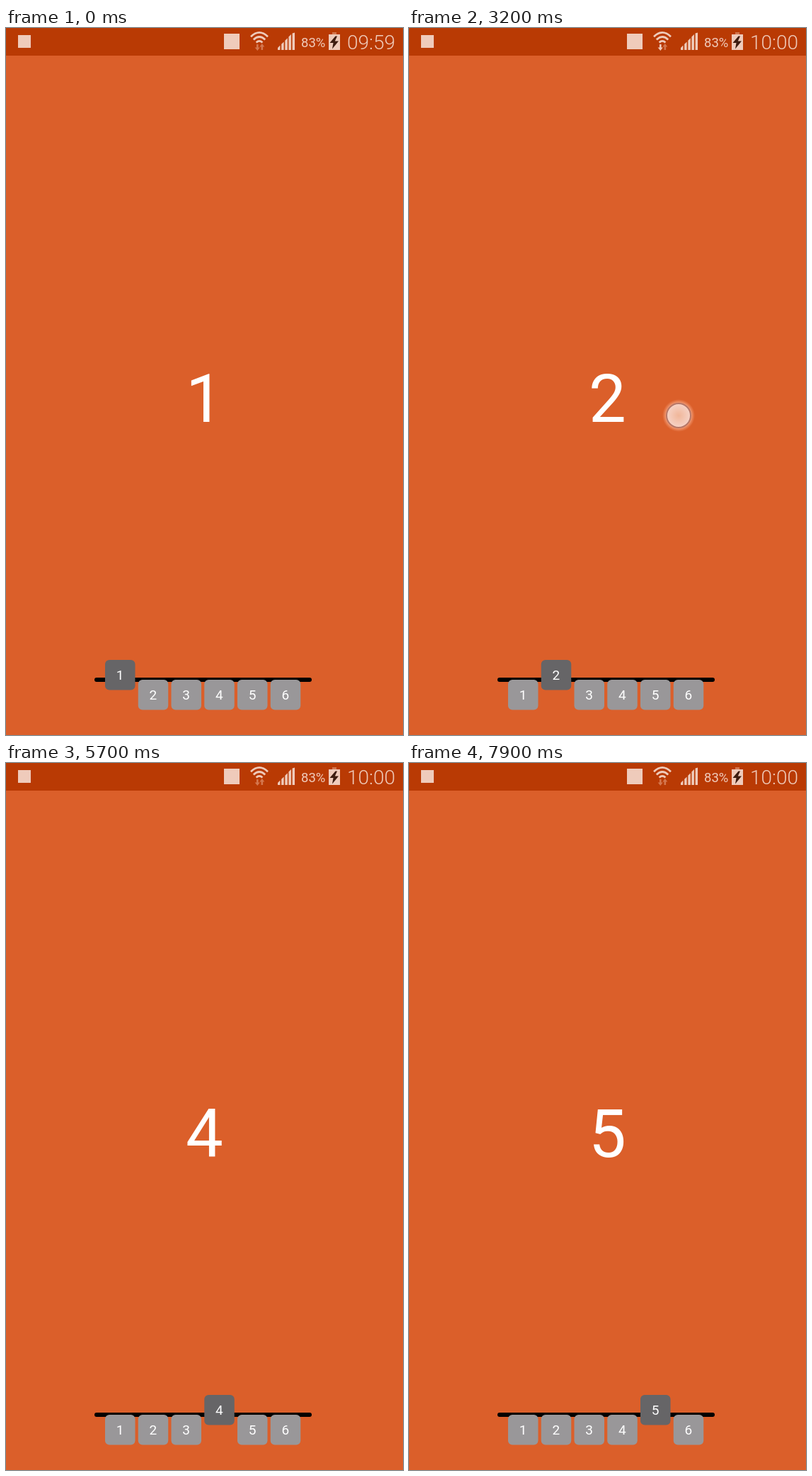
These frames come from a looping animation (561 px wide and 998 px high, 8000 ms). An HTML page:

```html
<!DOCTYPE html>
<html lang="en">
<head>
<meta charset="utf-8">
<title>Pager</title>
<style>
  html, body { margin: 0; width: 100%; height: 100%; overflow: hidden; background: #db5f2a; }
  svg { display: block; width: 100vw; height: 100vh; }
  text { font-family: Roboto, sans-serif; fill: #fff; text-anchor: middle; }
  .page { font-size: 94px; }
  .tab { font-size: 19px; }
  .status { fill: #efcbbb; }
  .status text { fill: #efcbbb; text-anchor: start; }
</style>
</head>
<body>
<svg viewBox="0 0 561 998">
  <defs>
    <radialGradient id="glow">
      <stop offset=".72" stop-color="#ffc3a8" stop-opacity=".75"/>
      <stop offset="1" stop-color="#ffb08c" stop-opacity="0"/>
    </radialGradient>
    <radialGradient id="dot">
      <stop offset="0" stop-color="#f0b699"/>
      <stop offset="1" stop-color="#f6d3c7"/>
    </radialGradient>
  </defs>
  <rect width="561" height="998" fill="#db5f2a"/>
  <rect width="561" height="39" fill="#b93a04"/>
  <g class="status">
    <rect x="17" y="10" width="18" height="18"/>
    <rect x="308" y="8" width="22" height="22"/>
    <g fill="none" stroke="#efcbbb" stroke-width="2.7">
      <path d="M346 12.2Q358 .6 370 12.2"/>
      <path d="M349.8 16.4Q358 8.6 366.2 16.4"/>
      <path d="M353.6 20.4Q358 16.4 362.4 20.4"/>
    </g>
    <path id="down" d="M354 23h2.6v4.5h2.2L355.300 32 351.600 27.500H354z"/>
    <path id="up" fill="#d4774f" d="M360.500 31h2.600v-4.500h2.200L361.800 22 358.300 26.500h2.200z"/>
    <path d="M384 31v-3l3.400-3.400V31zM389.200 31v-8.200l3.400-3.400V31zM394.300 31V17.700l3.500-3.500V31zM399.400 31V12.600l3.500-3.500V31zM404.600 31V7.600L408 6.500V31z"/>
    <text x="417" y="26.500" font-size="18.500">83%</text>
    <path fill="#d4774f" d="M461 6h6v4h-6z"/>
    <path d="M456 9h16v22h-16z"/>
    <path fill="#3d1c10" d="M465.500 11.500 457.500 21h5l-1.500 8.500 9-11h-5.200l3.200-7z"/>
    <text id="clock" x="482" y="30" font-size="28" font-weight="300"></text>
  </g>
  <g id="pages"></g>
  <path d="M128 920H429" stroke="#000" stroke-width="6" stroke-linecap="round"/>
  <g id="tabs"></g>
  <g id="touch">
    <circle r="23" fill="url(#glow)"/>
    <circle r="17" fill="url(#dot)" stroke="#b77767" stroke-width="2"/>
  </g>
</svg>
<script>
const LOOP = 8000, STEP = 100, WIDTH = 561, SETTLE = 480, FADE = 160, LIFT = 28;

// Each swipe goes one page on: touch times, finger path, page travel at release
const swipes = [
  { down: 1500, up: 1704, from: 345, to: 240, y: 560, drag: 91 },
  { down: 3200, up: 3328, from: 381, to: 320, y: 547, drag: 50 },
  { down: 4945, up: 5026, from: 352, to: 258, y: 547, drag: 77 },
  { down: 6500, up: 6626, from: 245, to: 200, y: 585, drag: 34 }
];

const $ = id => document.getElementById(id);
const clamp = v => Math.max(0, Math.min(1, v));

function add(parent, name, attrs, text = '') {
  const el = document.createElementNS('http://www.w3.org/2000/svg', name);
  for (const key in attrs) el.setAttribute(key, attrs[key]);
  el.textContent = text;
  return parent.appendChild(el);
}

const pages = [], tabs = [];
for (let i = 0; i < 6; i++) {
  pages.push(add($('pages'), 'text', { class: 'page', y: 555.5 }, i + 1));
  const g = add($('tabs'), 'g', {});
  const box = add(g, 'rect', { width: 42.5, height: 42.5, rx: 6 });
  add(g, 'text', { class: 'tab', x: 21, y: 27.8 }, i + 1);
  tabs.push({ g, box });
}

function draw(t) {
  let scroll = 0, selected = 0, tabPos = 0, touch = null;
  for (const s of swipes) {
    if (t < s.down) break;
    const pull = clamp((t - s.down) / (s.up - s.down));
    const rest = 1 - clamp((t - s.up) / SETTLE);
    if (t < s.up) {
      scroll += s.drag * pull;
    } else {
      scroll += WIDTH - (WIDTH - s.drag) * rest ** 5;
      tabPos += 1 - rest ** 2;
      selected++;
    }
    touch = { x: s.from + (s.to - s.from) * pull, y: s.y, alpha: 1 - clamp((t - s.up) / FADE) };
  }

  pages.forEach((p, i) => p.setAttribute('x', 280.5 + i * WIDTH - scroll));
  tabs.forEach(({ g, box }, i) => {
    const y = 920 - LIFT * clamp(1 - Math.abs(i - tabPos));
    g.setAttribute('transform', `translate(${140 + i * 46.75} ${y})`);
    box.setAttribute('fill', i === selected ? '#666567' : '#999799');
  });

  $('touch').setAttribute('opacity', touch ? touch.alpha : 0);
  if (touch) $('touch').setAttribute('transform', `translate(${touch.x} ${touch.y})`);
  $('clock').textContent = t < 100 ? '09:59' : '10:00';
  $('down').setAttribute('fill', t >= 2400 && t < 4100 ? '#efcbbb' : '#d4774f');
}

const start = performance.now();
function tick() {
  const t = (performance.now() - start) % LOOP;
  draw(Math.floor(t / STEP) * STEP);
  requestAnimationFrame(tick);
}
tick();
</script>
</body>
</html>
```
